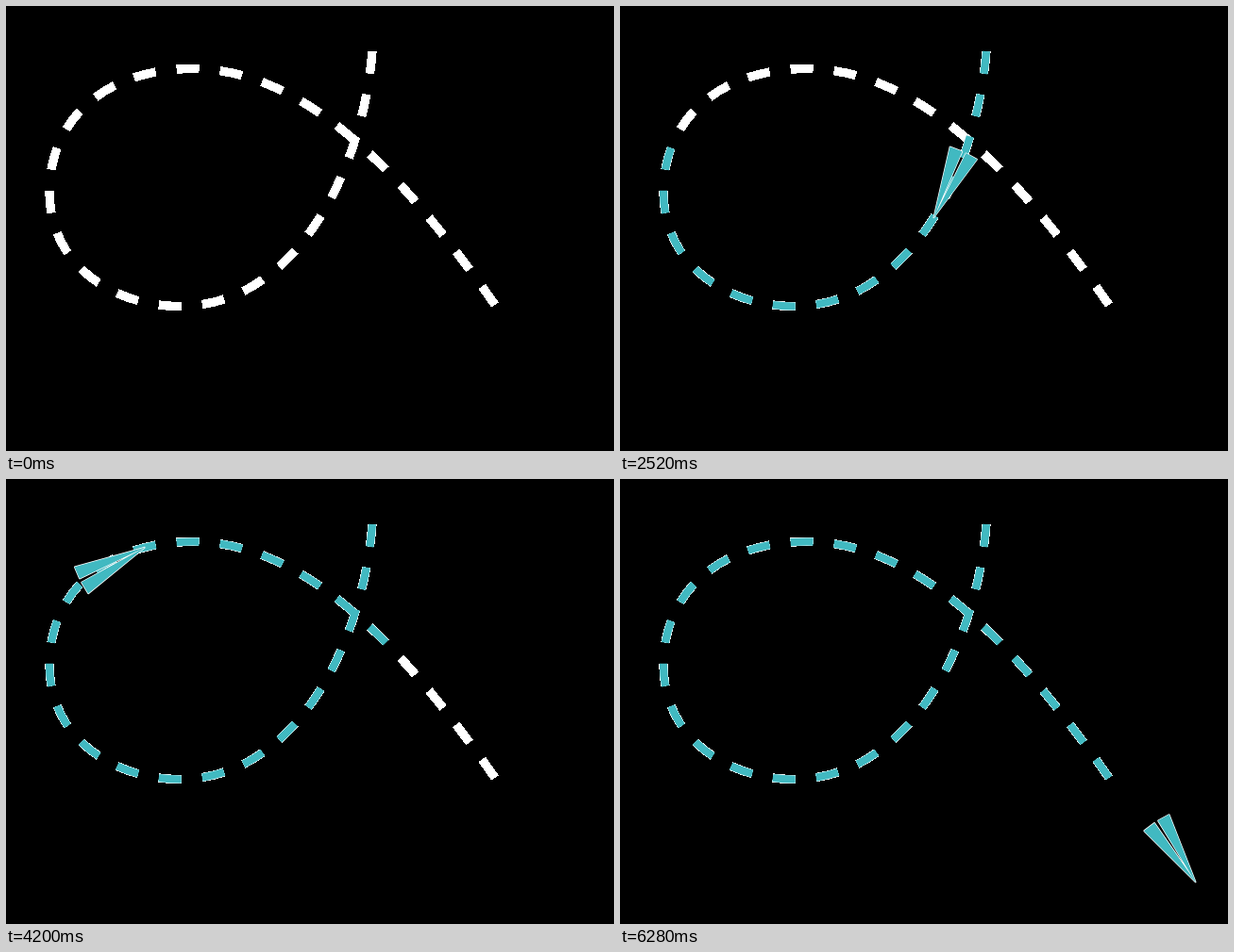
These frames come from a looping animation (644x472 px, 7520 ms). An HTML page:

```html
<!DOCTYPE html>
<html lang="en">
<head>
<meta charset="utf-8">
<title>Paper plane</title>
<style>
  html, body { margin: 0; width: 100%; height: 100%; overflow: hidden; background: #000; }
  svg { display: block; }
  .trail { fill: none; stroke-dasharray: .52 .48; }
  #base { stroke: #fff; stroke-width: 9.4; shape-rendering: crispEdges; }
  #done { stroke: #41b9c1; stroke-width: 8.2; }
  #plane { fill: #41b9c1; stroke: #fff; stroke-width: 1.4; stroke-linejoin: bevel; paint-order: stroke; }
</style>
</head>
<body>
<svg width="644" height="472">
  <defs><path id="route"/></defs>
  <!-- 26 dash periods and a last dash fill the whole length -->
  <path id="base" class="trail" pathLength="26.52"/>
  <path id="done" class="trail" pathLength="26.52"/>
  <path id="plane" d="M0 0L-77 2.3L-76 16.3ZM0 0L-77-2L-76-15.6Z"/>
</svg>
<script>
const [route, base, done, plane] =
  ['route', 'base', 'done', 'plane'].map(id => document.getElementById(id));
const LOOP = 7520, STEP = 40, ENTER = 1840, LAND = 6280;
const DASH = 0.52, DASHES_PER_MS = 0.00538;

const loop = '388 48C377.6 178 305 318.5 184 318.5S46 274 46 197'
  + 'S103 66.5 198 66.5S427 187 518 317';
const curve = loop
  .replace('S46 274', 'C113 318.5 46 274')
  .replace('S103 66.5', 'C46 122 103 66.5')
  .replace('S427 187', 'C321 66.5 427 187');
base.setAttribute('d', 'M' + curve);
done.setAttribute('d', 'M' + curve);
route.setAttribute('d', 'M392 0L' + curve + 'L610 428');
const length = route.getTotalLength();

// Heading of the plane in degrees at a few times.
const turns = [[ENTER, 100], [2520, 115], [3640, 262], [4720, 382], [LAND, 417]];

function slope(k) {
  const a = turns[Math.max(0, k - 1)], b = turns[Math.min(turns.length - 1, k + 1)];
  return (b[1] - a[1]) / (b[0] - a[0]);
}

function heading(t) {
  let i = 0;
  while (i < turns.length - 2 && t >= turns[i + 1][0]) i++;
  const [t0, a] = turns[i], [t1, b] = turns[i + 1];
  const span = t1 - t0, f = (t - t0) / span, g = 1 - f;
  return a * g * g * (1 + 2 * f) + b * f * f * (3 - 2 * f)
    + span * f * g * (slope(i) * g - slope(i + 1) * f);
}

function revealTrail(t) {
  const shown = t * DASHES_PER_MS, whole = Math.min(27, Math.floor(shown));
  const part = whole < 27 ? Math.min(shown - whole, DASH) : 0;
  done.style.strokeDasharray = `${DASH} ${1 - DASH} `.repeat(whole) + `${part} 99`;
}

function movePlane(t) {
  plane.style.visibility = t < ENTER ? 'hidden' : 'visible';
  if (t < ENTER) return;
  const left = ((LAND - t) / (LAND - ENTER)) ** 1.095;
  const { x, y } = route.getPointAtLength(length * (1 - left));
  plane.setAttribute('transform', `translate(${x} ${y}) rotate(${heading(t)})`);
}

function draw(now) {
  const t = Math.floor(now % LOOP / STEP) * STEP;
  revealTrail(t);
  movePlane(Math.min(t, LAND));
}

let start;
function frame(now) {
  start ??= now;
  draw(now - start);
  requestAnimationFrame(frame);
}
draw(0);
requestAnimationFrame(frame);
</script>
</body>
</html>
```
